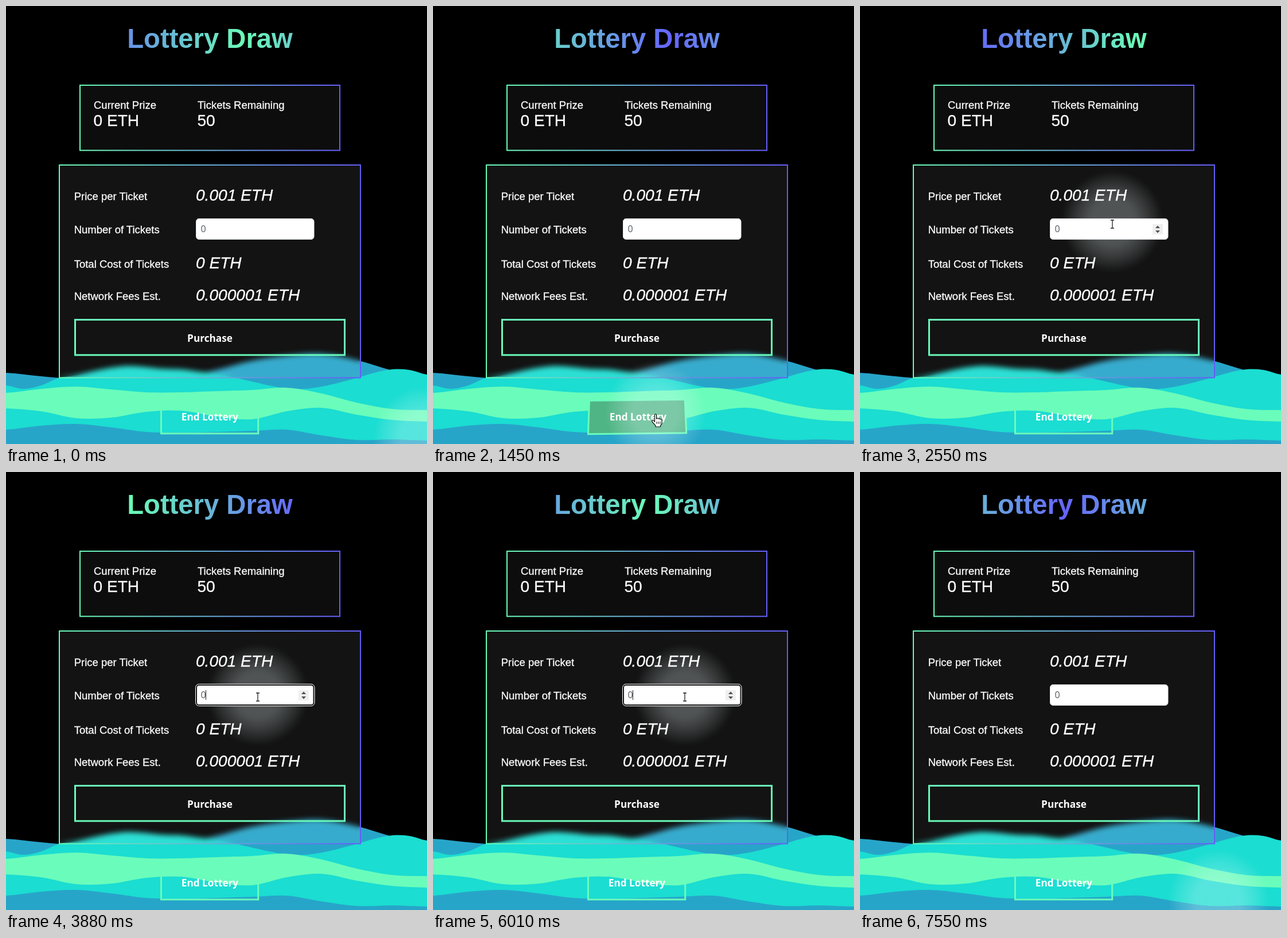
Animation of 734 by 763 pixels, one loop 7.59 s. Source, as an HTML page:

```html
<!DOCTYPE html>
<html lang="en">
<head>
<meta charset="utf-8">
<title>Lottery Draw</title>
<style>
  html, body { margin: 0; width: 100%; height: 100%; overflow: hidden; background: #000; }
  svg { position: absolute; left: 0; top: 0; width: 734px; height: 763px; }
  .panel { position: absolute; backdrop-filter: blur(5px); }
  #prize { left: 128px; top: 137px; width: 455px; height: 115.5px; background: rgba(255,255,255,.052); }
  #form { left: 92px; top: 276px; width: 527px; height: 372px; background: rgba(255,255,255,.076); }
  text { fill: #fff; font-family: "Liberation Sans", Arial, sans-serif; }
  .title { font-size: 47.2px; font-weight: bold; text-anchor: middle; }
  .label { font-size: 18.5px; stroke: #fff; stroke-width: .3; }
  .value { font-size: 28.1px; stroke: #fff; stroke-width: .3; }
  .italic { font-style: italic; }
  .button { font: bold 17.2px "Open Sans", "Noto Sans", sans-serif; text-anchor: middle; }
  .entry { font: 16px "Open Sans", "Noto Sans", sans-serif; fill: #555b61; }
  .frame { fill: none; stroke-width: 2; }
</style>
</head>
<body>
<svg viewBox="0 0 734 763">
  <defs>
    <radialGradient id="light">
      <stop offset=".45" stop-color="#effcff" stop-opacity=".28"/>
      <stop offset=".75" stop-color="#effcff" stop-opacity=".14"/>
      <stop offset="1" stop-color="#effcff" stop-opacity="0"/>
    </radialGradient>
  </defs>
  <g id="waves"></g>
  <polygon id="endFill" fill="#4fb585"/>
  <polygon id="endBorder" fill="none" stroke="#6afcbb" stroke-width="3"/>
  <circle id="glow" r="88" fill="url(#light)"/>
</svg>
<div class="panel" id="prize"></div>
<div class="panel" id="form"></div>
<svg viewBox="0 0 734 763">
  <defs>
    <linearGradient id="shimmer" gradientUnits="userSpaceOnUse" spreadMethod="reflect" y1="0" y2="0">
      <stop stop-color="#6afcb7"/><stop offset="1" stop-color="#6664fc"/>
    </linearGradient>
    <linearGradient id="edge">
      <stop stop-color="#6afcb7"/><stop offset="1" stop-color="#655df8"/>
    </linearGradient>
  </defs>
  <text class="title" x="355.5" y="73" style="fill:url(#shimmer)">Lottery Draw</text>

  <rect class="frame" x="129" y="138" width="453" height="113.500" stroke="url(#edge)"/>
  <text class="label" x="153" y="179">Current Prize</text>
  <text class="value" x="152.5" y="209">0 ETH</text>
  <text class="label" x="334" y="179">Tickets Remaining</text>
  <text class="value" x="333.5" y="209">50</text>

  <rect class="frame" x="93" y="277" width="525" height="370.500" stroke="url(#edge)"/>
  <text class="label" x="118.7" y="338">Price per Ticket</text>
  <text class="label" x="118.7" y="396">Number of Tickets</text>
  <text class="label" x="118.7" y="456">Total Cost of Tickets</text>
  <text class="label" x="118.7" y="512">Network Fees Est.</text>
  <text class="value italic" x="331" y="339">0.001 ETH</text>
  <text class="value italic" x="331" y="457">0 ETH</text>
  <text class="value italic" x="331" y="513">0.000001 ETH</text>

  <rect x="331.5" y="370.5" width="205.500" height="36" rx="5" fill="#fff" stroke="#dfe3e6"/>
  <g id="focus" fill="none">
    <rect x="332" y="371" width="204.500" height="35" rx="4.5" stroke="#101010" stroke-width="2"/>
    <rect x="330.5" y="369.5" width="207.500" height="38" rx="6" stroke="#fff"/>
  </g>
  <text class="entry" x="339.5" y="394">0</text>
  <path id="caret" d="M348.5 380V397" stroke="#222"/>
  <g id="spinner">
    <rect x="510" y="380" width="18" height="18" fill="#efefef"/>
    <path d="M515 387l4-4.500 4 4.500zM515 391l4 4.500 4-4.500z" fill="#505050"/>
  </g>

  <rect id="buyFill" x="122" y="548" height="58" fill="#4fb585"/>
  <rect x="120.500" y="546.500" width="470" height="61.500" fill="none" stroke="#6afcbb" stroke-width="3"/>
  <text class="button" x="355.5" y="584.5">Purchase</text>
  <text class="button" id="endText" y="722">End Lottery</text>

  <g id="hand"><path d="M-1.500 1Q0-1 1.500 1V8Q4 6 5 8Q7.500 7 8 9Q11 8 11 11V15Q11 18 8.500 20V22H0V20L-6 13Q-6.500 10-4 10.500L-1.500 13Z" fill="#fff" stroke="#111" stroke-width="1.200"/><path d="M2 13v4M5 13v4M8 13v4" stroke="#111"/></g>
  <path id="beam" d="M-3-7h2.500l.5.500.500-.500H3M0-6.500V6.500M-3 7h2.500l.500-.500.500.500H3" fill="none" stroke="#222" stroke-width="1.300"/>
  <path id="arrow" d="M0 0V17l4-4 3 7 3-1-3-7h5z" fill="#fff" stroke="#111"/>
</svg>
<script>
const LOOP = 7590;
const $ = id => document.getElementById(id);
const clamp = v => Math.max(0, Math.min(1, v));
const ease = v => v * v * (3 - 2 * v);
const lerp = (a, b, u) => a + (b - a) * u;
const show = (id, on) => $(id).style.display = on ? "" : "none";

// Contour heights at even steps across the stage, painted back to front.
const waves = [
  ["#27a5c9", [639, 645, 650, 650, 650, 646, 634, 618, 609, 606, 617, 635, 650]],
  ["#1bddd1", [661, 667, 661, 648, 643, 636, 630, 627, 629, 632, 633, 637, 641,
    647, 654, 661, 666, 667, 663, 656, 648, 639, 633, 634, 642]],
  ["#6afcbb", [674, 667, 663, 668, 673, 673, 671, 669, 665, 675, 691, 702, 704]],
  ["#1bddd1", [701, 706, 718, 717, 707, 705, 715, 720, 706, 700, 712, 721, 724]],
  ["#27a5c9", [738, 731, 728, 734, 742, 743, 742, 740, 738, 748, 756, 755, 757]]
];

function wavePath(ys) {
  const step = 734 / (ys.length - 1);
  const slope = i => ((ys[i + 1] ?? ys[i]) - (ys[i - 1] ?? ys[i])) / 6;
  let d = `M0 763V${ys[0]}`;
  for (let i = 1; i < ys.length; i++) {
    const x = i * step;
    d += `C${x - step * 2 / 3} ${ys[i - 1] + slope(i - 1)} ${x - step / 3} ${ys[i] - slope(i)} ${x} ${ys[i]}`;
  }
  return d + "V763Z";
}
$("waves").innerHTML = waves.map(([fill, ys]) => `<path fill="${fill}" d="${wavePath(ys)}"/>`).join("");

// Pointer path: time, x, y
const track = [
  [0, 728, 755], [120, 710, 745], [550, 417, 689], [900, 388, 711], [1700, 388, 711],
  [2000, 425, 570], [2250, 440, 378], [2550, 440, 380], [2750, 439, 392],
  [6280, 439, 392], [6550, 500, 610], [6850, 625, 750]
];

function pointer(t) {
  const i = track.findIndex(k => k[0] > t);
  if (i < 0) return track[track.length - 1].slice(1);
  if (i === 0) return track[0].slice(1);
  const [t0, x0, y0] = track[i - 1], [t1, x1, y1] = track[i];
  const u = ease((t - t0) / (t1 - t0));
  return [lerp(x0, x1, u), lerp(y0, y1, u)];
}

const hover = (t, from, to, length) => ease(clamp((t - from) / length)) - ease(clamp((t - to) / length));

function drawEndButton(h) {
  const tl = [270.5 + 2 * h, 686.5 + h], tr = [439.7 - h / 2, 686.5 - h];
  const br = [439.7 + 2 * h, 744.8 - h], bl = [270.5, 744.8 + h];
  const along = (a, b) => a.map((v, i) => lerp(v, b[i], h));
  $("endBorder").setAttribute("points", [tl, tr, br, bl].join(" "));
  $("endFill").setAttribute("points", [tl, along(tl, tr), along(bl, br), bl].join(" "));
  $("endText").setAttribute("x", 355.5 + 2 * h);
}

function drawPointer(t) {
  const [x, y] = pointer(t);
  const visible = t > 60 && t < 6800;
  const onInput = y > 370 && y < 407;
  const onButton = (y > 545 && y < 609) || (y > 685 && y < 746 && x > 269 && x < 441);
  const shape = onInput ? "beam" : onButton ? "hand" : "arrow";
  for (const id of ["beam", "hand", "arrow"]) {
    show(id, visible && id === shape);
    $(id).setAttribute("transform", `translate(${x} ${y})`);
  }
  show("spinner", visible && onInput);
  const [gx, gy] = pointer(t - 80);
  $("glow").setAttribute("cx", gx);
  $("glow").setAttribute("cy", gy - 4);
}

function draw(t) {
  const green = 415 - 0.199 * t;
  $("shimmer").setAttribute("x1", green);
  $("shimmer").setAttribute("x2", green + 289);
  drawEndButton(hover(t, 500, 1790, 400));
  const sweep = hover(t, 1930, 2070, 300) + hover(t, 6460, 6560, 250);
  $("buyFill").setAttribute("width", 467 * sweep);
  const focused = t > 2700 && t < 7100;
  show("focus", focused);
  show("caret", focused && (t - 2700) % 1060 < 530);
  drawPointer(t);
}

const start = performance.now();
function tick() {
  draw((performance.now() - start) % LOOP);
  requestAnimationFrame(tick);
}
tick();
</script>
</body>
</html>
```
